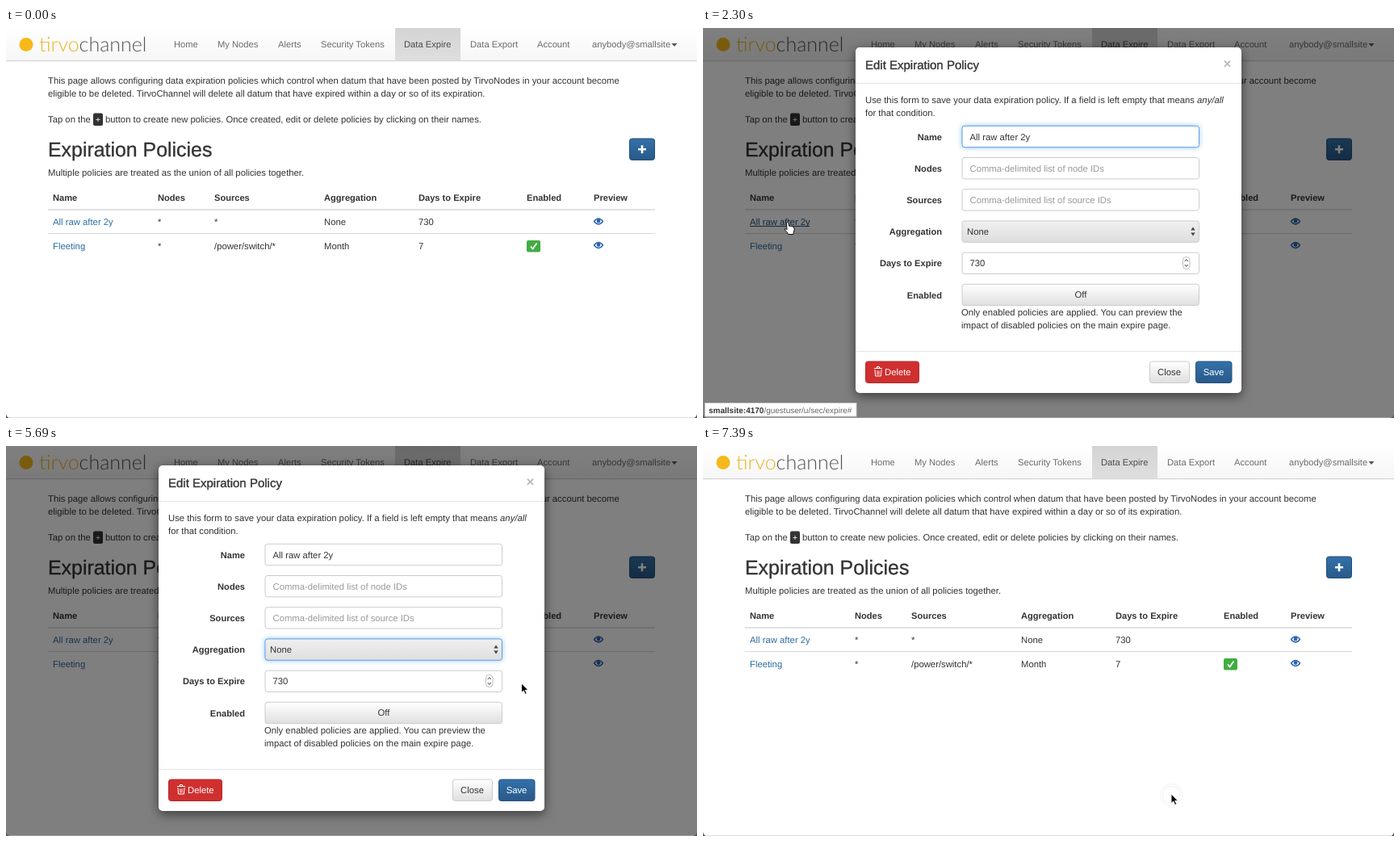
Animation of 856x483 px, one loop 8 s. Source, as an HTML page:

```html
<!DOCTYPE html>
<html lang="en">
<head>
<meta charset="utf-8">
<title>Expiration policies</title>
<style>
  html, body { margin: 0; width: 100%; height: 100%; overflow: hidden; background: #fff; }
  svg { display: block; width: 100vw; height: 100vh; }
  text { font: 11.3px "Liberation Sans", Arial, sans-serif; fill: #333; text-rendering: geometricPrecision; white-space: pre; }
  .nav text { font-size: 11.2px; fill: #6b6b6b; }
  .nav .active { fill: #4a4a4a; }
  .bold { font-weight: bold; font-size: 11.1px; }
  .link { fill: #2d6ca2; }
  .white { fill: #fff; }
  .mid { text-anchor: middle; }
  .end { text-anchor: end; }
  .hint { fill: #999; }
  .medium { stroke: #333; stroke-width: .35px; }
  .input { fill: #fff; stroke: #ccc; }
  .button { fill: url(#grey); stroke: #ccc; }
  .focus { stroke: #5f9fe6; filter: drop-shadow(0 0 3px #66afe9b0); }
  .shadow { filter: drop-shadow(0 4px 7px #0008); }
  .logo { font: 300 25px Lato, "Open Sans", sans-serif; }
</style>
</head>
<body>
<svg viewBox="0 0 856 483">
  <defs>
    <linearGradient id="bar" x2="0" y2="1"><stop stop-color="#fff"/><stop offset="1" stop-color="#f6f6f6"/></linearGradient>
    <linearGradient id="tab" x2="0" y2="1"><stop stop-color="#d4d4d4"/><stop offset="1" stop-color="#dedede"/></linearGradient>
    <linearGradient id="grey" x2="0" y2="1"><stop stop-color="#fff"/><stop offset="1" stop-color="#dfdfdf"/></linearGradient>
    <linearGradient id="select" x2="0" y2="1"><stop stop-color="#f0f0f0"/><stop offset="1" stop-color="#dedede"/></linearGradient>
    <linearGradient id="blue" x2="0" y2="1"><stop stop-color="#3371a9"/><stop offset="1" stop-color="#29598a"/></linearGradient>
    <g id="eye">
      <path d="M-5.5 0Q0-7 5.5 0Q0 7-5.5 0Z" fill="#fff" stroke="#2d66ad" stroke-width="1.3"/>
      <circle cy="-.5" r="2.4" fill="#2d66ad"/>
    </g>
  </defs>

  <g id="page">
    <rect width="856" height="483" fill="#fff"/>
    <rect width="856" height="40" fill="url(#bar)"/>
    <rect y="40" width="856" height="1" fill="#d6d6d6"/>
    <rect y="41" width="856" height="1" fill="#f2f2f2"/>
    <rect x="482" width="81" height="40" fill="url(#tab)"/>
    <circle cx="25" cy="20.5" r="8.5" fill="#f6b81a"/>
    <text class="logo" x="41" y="29"><tspan fill="#e9b526">tirvo</tspan><tspan fill="#555">channel</tspan></text>
    <g class="nav" id="nav"></g>
    <path d="M824.5 19h7l-3.500 4z" fill="#555"/>

    <text x="52" y="69">This page allows configuring data expiration policies which control when datum that have been posted by TirvoNodes in your account become</text>
    <text x="52" y="85">eligible to be deleted. TirvoChannel will delete all datum that have expired within a day or so of its expiration.</text>
    <text x="52" y="117">Tap on the</text>
    <rect x="108" y="105.500" width="12" height="15.500" rx="2" fill="#333"/>
    <path d="M111.500 113.500h5m-2.500-2.500v5" stroke="#ddd"/>
    <text x="123" y="117">button to create new policies. Once created, edit or delete policies by clicking on their names.</text>

    <text class="medium" x="52" y="158.500" style="font-size:24.900px">Expiration Policies</text>
    <rect x="772.500" y="137" width="31" height="26.500" rx="3" fill="url(#blue)" stroke="#234f78"/>
    <path d="M783 150.200h10m-5-5v10" stroke="#fff" stroke-width="2.600"/>
    <text x="52" y="183">Multiple policies are treated as the union of all policies together.</text>

    <g id="table"></g>
    <path d="M52 225h752" stroke="#d8d8d8" stroke-width="1.600"/>
    <path d="M52 254.500h752" stroke="#d8d8d8"/>
    <path id="underline" d="M58 245.500h74" stroke="#23527c"/>
    <rect x="645" y="263" width="17" height="14.500" rx="2" fill="#41ad41"/>
    <path d="M650 270.500l2.500 3 5-7" fill="none" stroke="#fff" stroke-width="1.800"/>
    <use href="#eye" x="734" y="239.500"/>
    <use href="#eye" x="734" y="269"/>
  </g>
  <rect id="backdrop" width="856" height="483"/>

  <g id="modal">
    <rect class="shadow" x="189" y="24" width="478" height="428" rx="5" fill="#fff"/>
    <path d="M189 68.500h478M189 400.500h478" stroke="#e5e5e5"/>
    <text class="medium" x="201" y="51" style="font-size:15px">Edit Expiration Policy</text>
    <text class="bold mid" x="649.500" y="50" style="font-size:17px;fill:#bbb">×</text>
    <text x="201" y="93">Use this form to save your data expiration policy. If a field is left empty that means <tspan font-style="italic">any/all</tspan></text>
    <text x="201" y="109">for that condition.</text>
    <g id="form"></g>
    <path id="caret" d="M406.500 127.500v14" stroke="#333"/>
    <path d="M604.300 250.500l2.700-4 2.700 4zM604.300 253.500l2.700 4 2.700-4z" fill="#444"/>
    <rect x="594.500" y="283.500" width="8.500" height="15" rx="4" fill="#fff" stroke="#bbb"/>
    <path d="M596.800 289l2-2.500 2 2.500m-4 4l2 2.500 2-2.500" fill="none" stroke="#444"/>
    <text class="mid" x="468" y="334">Off</text>
    <text x="320" y="356">Only enabled policies are applied. You can preview the</text>
    <text x="320" y="372">impact of disabled policies on the main expire page.</text>

    <rect x="201.500" y="413" width="66" height="26.500" rx="3" fill="#cf302f" stroke="#b22a2a"/>
    <path d="M212 421.500h10m-6.500 0v-2h3v2m-5.500 1.500l.6 8h6.800l.6-8m-5 1.500v5m2-5v5" fill="none" stroke="#fff"/>
    <text class="white" x="225" y="430">Delete</text>
    <rect id="close" class="button" x="553.500" y="413" width="49" height="26.500" rx="3"/>
    <text class="mid" x="577.500" y="430">Close</text>
    <rect x="610.500" y="413" width="44.500" height="26.500" rx="3" fill="url(#blue)" stroke="#245580"/>
    <text class="white mid" x="632.500" y="430">Save</text>
  </g>

  <g id="popup">
    <rect class="shadow" x="310" y="242.500" width="295" height="77.500" rx="3" fill="#f1f1f1" stroke="#aaa" stroke-width=".6"/>
    <rect id="highlight" x="310" y="247" width="295" height="17.600" fill="#3b84f2"/>
    <g id="options"></g>
    <path id="tick" d="M315.500 256l2.200 3 4-7" fill="none" stroke-width="1.500"/>
  </g>

  <g id="status">
    <rect x="2.500" y="464.500" width="187.500" height="16.500" fill="#fff" stroke="#ccc"/>
    <text x="7" y="476.500" style="font-size:10px;fill:#666"><tspan font-weight="bold" fill="#333">smallsite:4170</tspan>/guestuser/u/sec/expire#</text>
  </g>
  <path d="M0 478v5h5q-4 0-5-5zM856 478v5h-5q4 0 5-5z" fill="#555"/>
  <path d="M4 482.700h848" stroke="#bbb" stroke-width=".6"/>

  <g id="pointer">
    <g id="ring" fill="none">
      <circle stroke="#777" stroke-width="3.400"/>
      <circle stroke="#fff" stroke-width="2.200"/>
    </g>
    <path id="arrow" d="M0-1v11.500l2.700-2.500 2 4.500 2-.9-2-4.300h3.700z" stroke="#fff" stroke-width=".9"/>
    <path id="hand" d="M-1.500-2q1.500-1.500 2.300.5l1 4 1.300-.3 1 .6 1.400-.2 1 1 1.300.3q1 3-.6 6l-.3 2.600h-6.400q-1-2.800-4-5.500-1-2 1.300-1.200l1.200.9z" fill="#fff" stroke="#111"/>
  </g>
</svg>

<script>
const $ = id => document.getElementById(id);
const text = (x, y, words, cls = '') => `<text x="${x}" y="${y}" class="${cls}">${words}</text>`;

const tabs = { 208: 'Home', 262: 'My Nodes', 337: 'Alerts', 390: 'Security Tokens', 493: 'Data Expire',
  575: 'Data Export', 658: 'Account', 726: 'anybody@smallsite' };
$('nav').innerHTML = Object.entries(tabs)
  .map(([x, name]) => text(x, 24, name, name === 'Data Expire' ? 'active' : '')).join('');

const columns = [58, 188, 258, 394, 511, 645, 728];
const rows = [
  [214, 'Name', 'Nodes', 'Sources', 'Aggregation', 'Days to Expire', 'Enabled', 'Preview'],
  [244, 'All raw after 2y', '*', '*', 'None', '730'],
  [273.5, 'Fleeting', '*', '/power/switch/*', 'Month', '7'],
];
$('table').innerHTML = rows.map(([y, ...cells], r) => cells.map((cell, c) =>
  text(columns[c], y, cell, r === 0 ? 'bold' : c === 0 ? 'link' : '')).join('')).join('');
const policyLink = $('table').querySelector('.link');

const fields = [
  ['Name', 'All raw after 2y'],
  ['Nodes', 'Comma-delimited list of node IDs', 'hint'],
  ['Sources', 'Comma-delimited list of source IDs', 'hint'],
  ['Aggregation', 'None'],
  ['Days to Expire', '730'],
  ['Enabled', ''],
];
$('form').innerHTML = fields.map(([label, value, cls], i) => {
  const y = 134.5 + 39.2 * i, isSelect = i === 3;
  return text(296, y + 4, label, 'bold end')
    + `<rect x="321" y="${y - 13.2}" width="293.5" height="26.4" rx="3" class="${i === 5 ? 'button' : 'input'}"
        ${isSelect ? 'style="fill:url(#select)"' : ''}/>`
    + text(isSelect ? 327 : 330.5, y + 4, value, cls);
}).join('');
const boxes = $('form').querySelectorAll('rect');

$('options').innerHTML = ['None', 'Hour', 'Day', 'Month']
  .map((name, i) => text(327, 260 + 17.6 * i, name)).join('');

const clamp = v => Math.min(1, Math.max(0, v));
const smooth = v => v * v * (3 - 2 * v);
const easeOut = v => 1 - (1 - v) ** 1.7;
const within = (t, from, to) => t >= from && t < to;
const show = (id, on) => $(id).setAttribute('display', on ? 'inline' : 'none');

// Each move: start, end, x, y of its destination
const moves = [[100, 600, 105, 243], [2600, 3100, 443, 248], [3900, 4400, 659, 247], [5490, 6090, 580, 432]];
const clicks = [1200, 3100, 4690, 6890];

function pointerAt(t) {
  let x = 112, y = 330;
  for (const [start, end, toX, toY] of moves) {
    const k = smooth(clamp((t - start) / (end - start)));
    x += (toX - x) * k;
    y += (toY - y) * k;
  }
  return [x, y];
}

function draw(t) {
  const [x, y] = pointerAt(t);
  const overLink = within(t, 600, 2700);
  const hand = within(t, 600, 2600) || within(t, 6090, 7090);
  show('pointer', t >= 100);
  show('hand', hand);
  show('arrow', !hand);
  $('pointer').setAttribute('transform', `translate(${x} ${y})`);

  const click = clicks.find(c => within(t, c, c + 600));
  show('ring', click !== undefined);
  if (click !== undefined) {
    const age = (t - click) / 500;
    $('ring').setAttribute('opacity', Math.max(.12, .9 - .78 * age));
    for (const circle of $('ring').children) circle.setAttribute('r', 5 + 7 * age);
  }

  show('status', overLink);
  show('underline', overLink);
  policyLink.style.fill = overLink ? '#23527c' : '';

  const closing = t >= 6940;
  const shade = closing ? 1 - clamp((t - 7240) / 150) : clamp((t - 1245) / 150);
  $('backdrop').setAttribute('opacity', shade / 2);
  const slide = closing ? easeOut(clamp((t - 6940) / 300)) : 1 - easeOut(clamp((t - 1455) / 300));
  $('modal').setAttribute('opacity', closing ? 1 - clamp((t - 6940) / 150) : clamp((t - 1470) / 150));
  $('modal').setAttribute('transform', `translate(0 ${-107 * slide})`);

  boxes[0].classList.toggle('focus', within(t, 1900, 3100));
  boxes[3].classList.toggle('focus', t >= 3200);
  show('caret', within(t, 1900, 2300));
  $('close').style.fill = t >= 6090 ? '#e0e0e0' : '';
  $('close').style.stroke = t >= 6090 ? '#adadad' : '';

  const highlighted = x < 605;
  show('popup', within(t, 3300, 4790));
  show('highlight', highlighted);
  $('options').firstChild.style.fill = highlighted ? '#fff' : '';
  $('tick').setAttribute('stroke', highlighted ? '#fff' : '#222');
}

// The screen refreshes ten times a second, 10 ms earlier after the pause at 4690
function tick(now) {
  const t = now % 8000, offset = t >= 4690 ? 90 : 0;
  draw(Math.min(7390, Math.floor((t - offset) / 100) * 100 + offset));
  requestAnimationFrame(tick);
}
draw(0);
requestAnimationFrame(tick);
</script>
</body>
</html>
```
